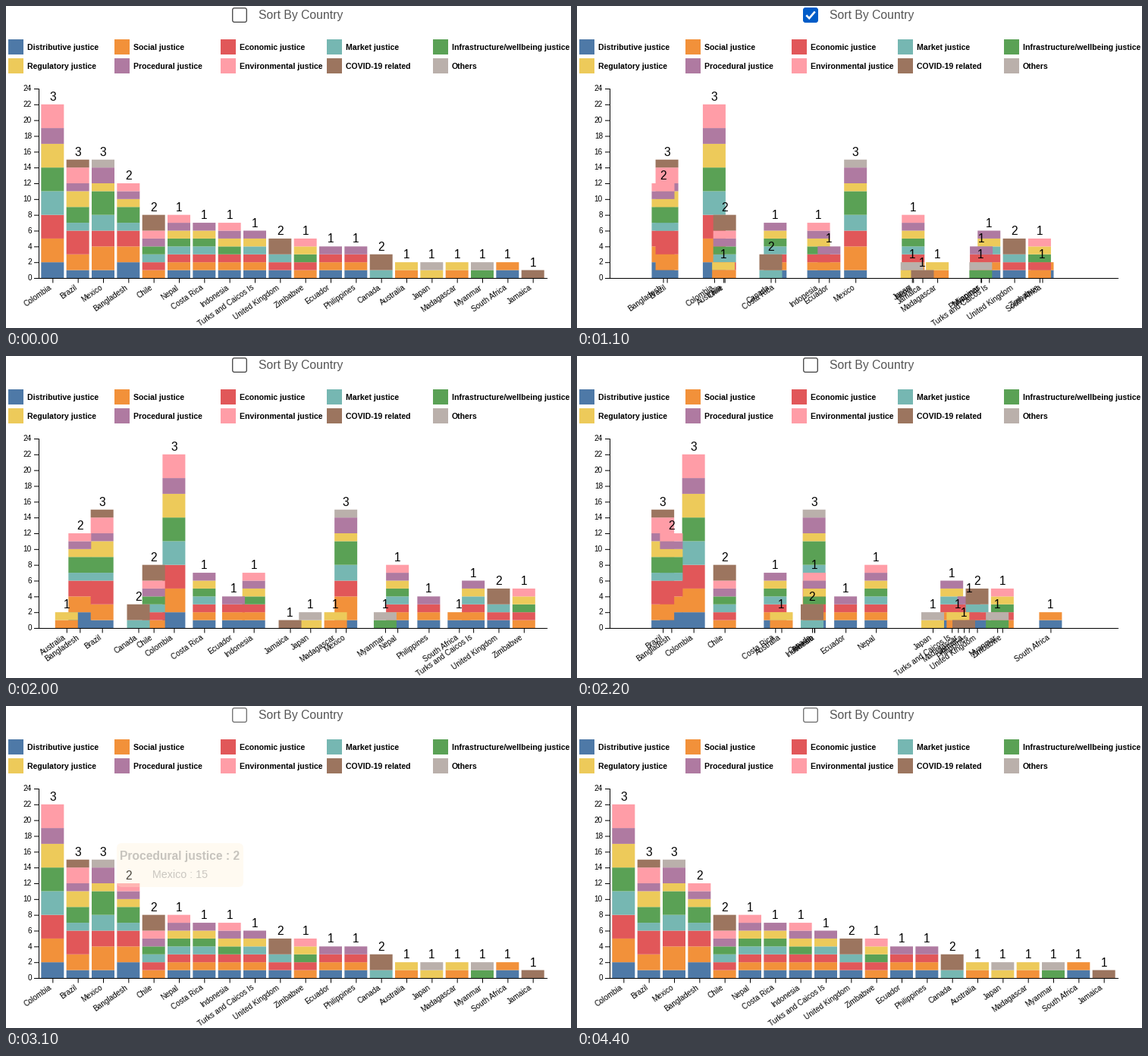
Recreate the animation shown at these times as a matplotlib script. Size 745 by 425 pixels, loop 5300 ms.

```python
import matplotlib.pyplot as plt
from matplotlib.animation import FuncAnimation
from matplotlib.patches import FancyBboxPatch, Rectangle

plt.rcParams["font.family"] = "Liberation Sans"
plt.rcParams["text.hinting"] = "force_autohint"
plt.rcParams["toolbar"] = "None"

WIDTH, HEIGHT, DPI = 745, 425, 100
FRAMES, INTERVAL = 53, 100
LEFT, TOP, BASE, AXIS_WIDTH = 43, 109, 359, 670
UNIT = (BASE - TOP) / 24

SERIES = [
    ("Distributive justice", "#4e79a7"),
    ("Social justice", "#f2913a"),
    ("Economic justice", "#e15759"),
    ("Market justice", "#76b7b2"),
    ("Infrastructure/wellbeing justice", "#5aa155"),
    ("Regulatory justice", "#edca5a"),
    ("Procedural justice", "#af7aa1"),
    ("Environmental justice", "#ff9da7"),
    ("COVID-19 related", "#9c755f"),
    ("Others", "#bab0ab"),
]
LEGEND_ROWS = [(0, 1, 2, 3, 4), (5, 6, 7, 8, 9)]

# country, label above the bar, one digit per series
COUNTRIES = [
    ("Colombia", 3, "2333332300"),
    ("Brazil", 3, "1231221210"),
    ("Mexico", 3, "1322312001"),
    ("Bangladesh", 2, "2221211100"),
    ("Chile", 2, "0111101120"),
    ("Nepal", 1, "1111111100"),
    ("Costa Rica", 1, "1111111000"),
    ("Indonesia", 1, "1110111100"),
    ("Turks and Caicos Is", 1, "1111011000"),
    ("United Kingdom", 2, "1011000020"),
    ("Zimbabwe", 1, "0110110100"),
    ("Ecuador", 1, "1110001000"),
    ("Philippines", 1, "1110001000"),
    ("Canada", 2, "0001000020"),
    ("Australia", 1, "0100010000"),
    ("Japan", 1, "0000010001"),
    ("Madagascar", 1, "0100010000"),
    ("Myanmar", 1, "0000100001"),
    ("South Africa", 1, "1100000000"),
    ("Jamaica", 1, "0000000010"),
]
STEP = AXIS_WIDTH / (len(COUNTRIES) + 0.1)
BAR_WIDTH = 0.9 * STEP

# start ms, series, box x, box y, opacity
TOOLTIP_STEPS = [
    (3100, 6, 146, 181, 0.3),
    (3200, 6, 146, 181, 0.65),
    (3300, 6, 146, 181, 0.9),
    (3600, 4, 138, 204, 0.9),
    (3700, 4, 137.5, 213, 0.9),
    (3800, 4, 137, 221, 0.9),
    (4100, 3, 138, 243, 0.9),
    (4200, 3, 138, 252, 0.9),
    (4400, None, 0, 0, 0),
]
TOOLTIP_WIDTHS = {6: 167, 4: 263, 3: 134}

fig = plt.figure(figsize=(WIDTH / DPI, HEIGHT / DPI), dpi=DPI, facecolor="white")
ax = fig.add_axes([0, 0, 1, 1])
ax.set(xlim=(0, WIDTH), ylim=(HEIGHT, 0))
ax.axis("off")


def text(x, y, label, px, **style):
    style = {"va": "baseline", "color": "black", **style}
    return ax.text(x, y, label, fontsize=px * 72 / DPI, **style)


def rect(x, y, w, h, color, **style):
    return ax.add_patch(Rectangle((x, y), w, h, fc=color, lw=0, snap=False, **style))


def line(xs, ys, px=1, color="black", **style):
    return ax.plot(xs, ys, color=color, lw=px * 72 / DPI, snap=False,
                   solid_capstyle="butt", **style)[0]


def rounded(x, y, w, h, radius, **style):
    box = f"round,pad=0,rounding_size={radius}"
    return ax.add_patch(FancyBboxPatch((x, y), w, h, boxstyle=box, snap=False, **style))


def ease(t):
    t = min(max(t, 0), 1)
    return 4 * t**3 if t < 0.5 else 1 - 4 * (1 - t) ** 3


def sort_amount(ms):
    """0 = ordered by total, 1 = ordered by country name."""
    if ms < 1800:
        return ease((ms - 660) / 750)
    if 2400 <= ms < 2700:
        ms = 2400  # the motion stalls here, then jumps to its end
    return 1 - ease((ms - 1839) / 750)


class Column:
    def __init__(self, rank, name, label, counts):
        self.rank = rank
        self.sorted_rank = sorted(c[0] for c in COUNTRIES).index(name)
        self.bars = []
        total = 0
        for layer, count in enumerate(map(int, counts)):
            if count:
                total += count
                self.bars.append(rect(0, BASE - total * UNIT, BAR_WIDTH, count * UNIT,
                                      SERIES[layer][1], zorder=1 + layer / 20))
        self.tick = line([0, 0], [BASE + 1, BASE + 6.5], zorder=2)
        self.name = text(0, BASE + 14, name, 10, ha="right", rotation=35,
                         rotation_mode="anchor")
        self.label = text(0, BASE - total * UNIT - 5, label, 15.5, ha="center")

    def place(self, amount):
        rank = self.rank + (self.sorted_rank - self.rank) * amount
        x = LEFT + 0.1 * STEP + rank * STEP
        center = x + BAR_WIDTH / 2
        for bar in self.bars:
            bar.set_x(x)
        self.tick.set_xdata([center + 0.5] * 2)
        self.name.set_x(center)
        self.label.set_x(center)


class Checkbox:
    def __init__(self):
        self.box = rounded(298.7, 2.7, 18.6, 18.6, 2.5, lw=1.4 * 72 / DPI)
        self.mark = line([302.3, 306.2, 313.8], [12.2, 16.2, 7.4], 2.6, "white",
                         solid_joinstyle="miter", zorder=3)
        text(333, 17, "Sort By Country", 15.7, color="#555555")

    def update(self, checked, hovered):
        blue = "#005cc8"
        self.box.set_facecolor(blue if checked else "white")
        self.box.set_edgecolor(blue if checked else "#4f4f4f" if hovered else "#767676")
        self.mark.set_visible(checked)


class Tooltip:
    def __init__(self):
        self.box = rounded(0, 0, 10, 58, 7, fc="#fff0d2", lw=0, zorder=8)
        self.title = text(0, 0, "", 15.6, weight="bold", color="#484848",
                          ha="center", zorder=9)
        self.total = text(0, 0, "", 14.2, color="#505050", ha="center", zorder=9)

    def update(self, ms):
        series, x, y, alpha = None, 0, 0, 0
        for start, *state in TOOLTIP_STEPS:
            if ms >= start:
                series, x, y, alpha = state
        for part in (self.box, self.title, self.total):
            part.set_visible(series is not None)
            part.set_alpha(alpha)
        if series is None:
            return
        country, _, counts = COUNTRIES[2]
        width = TOOLTIP_WIDTHS[series]
        self.box.set_bounds(x, y, width, 58)
        self.title.set_text(f"{SERIES[series][0]} : {counts[series]}")
        self.title.set_position((x + width / 2, y + 22))
        self.total.set_text(f"{country} : {sum(map(int, counts))}")
        self.total.set_position((x + width / 2, y + 46))


def draw_legend():
    for row, members in enumerate(LEGEND_ROWS):
        for col, index in enumerate(members):
            name, color = SERIES[index]
            x, y = 3 + 140 * col, 44 + 25 * row
            rect(x, y, 20, 20, color)
            text(x + 25, y + 14.4, name, 10.5, weight="bold")


def draw_axes():
    line([LEFT + 0.5] * 2, [TOP, BASE + 1], zorder=2)
    line([LEFT, LEFT + AXIS_WIDTH + 1], [BASE + 0.5] * 2, zorder=2)
    for value in range(0, 25, 2):
        y = BASE - value * UNIT + 0.5
        line([LEFT - 6, LEFT], [y, y])
        text(LEFT - 9, y + 2.7, value, 10, ha="right")


draw_legend()
draw_axes()
columns = [Column(rank, *row) for rank, row in enumerate(COUNTRIES)]
checkbox = Checkbox()
tooltip = Tooltip()


def draw(frame):
    ms = frame * INTERVAL
    amount = sort_amount(ms)
    for column in columns:
        column.place(amount)
    checkbox.update(checked=600 <= ms < 1800, hovered=ms < 2700)
    tooltip.update(ms)
    return []


animation = FuncAnimation(fig, draw, frames=FRAMES, interval=INTERVAL,
                          repeat=True, repeat_delay=0)
plt.show()
```
